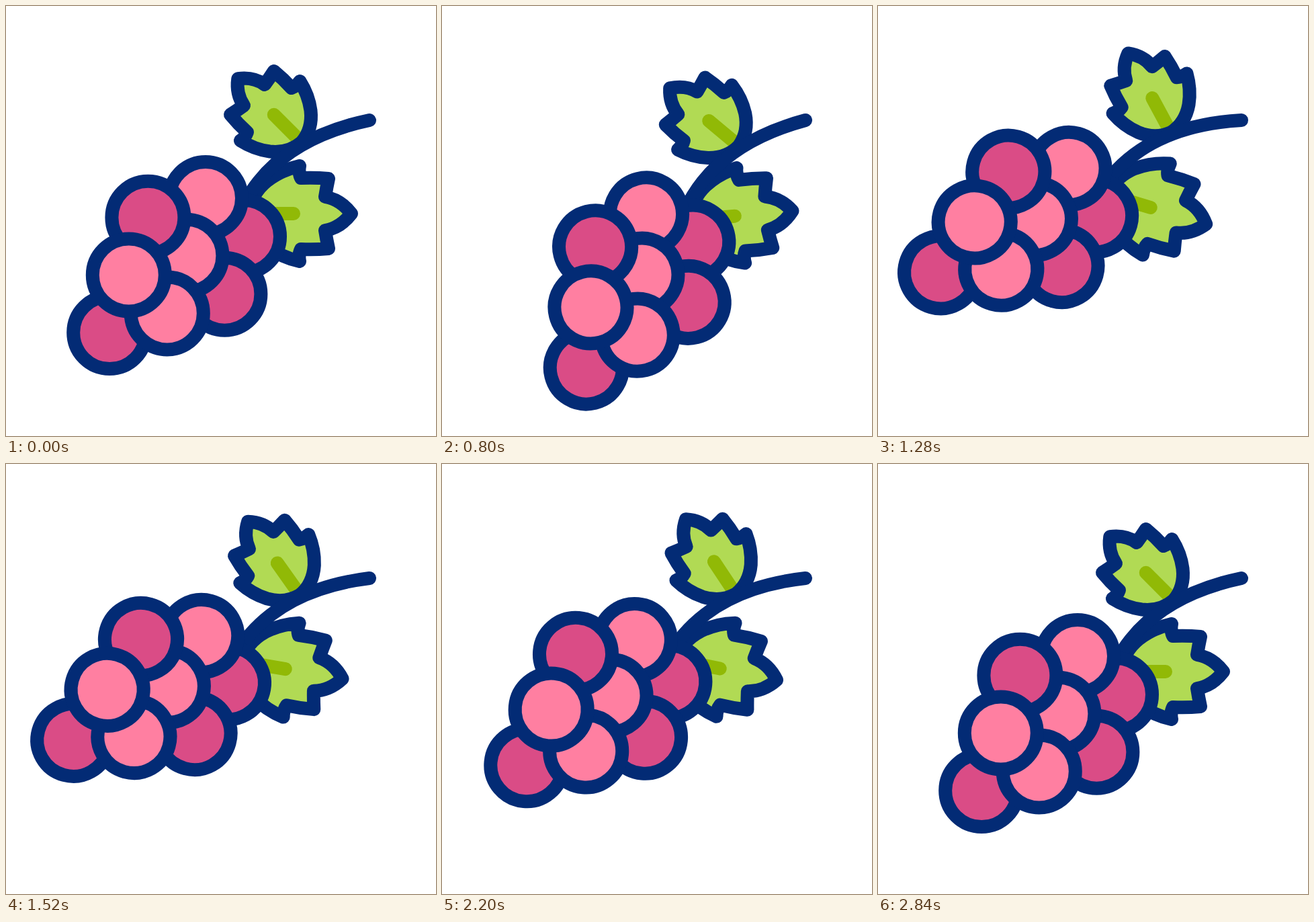
An HTML page for the animation above (3000 ms loop, 640 by 640 pixels).

```html
<!DOCTYPE html>
<html lang="en">
<head>
<meta charset="utf-8">
<title>Swinging grapes</title>
<style>
  html, body { margin: 0; width: 100%; height: 100%; overflow: hidden; background: #fff; }
  svg { display: block; width: 100%; height: 100%; }
  path, circle { fill: none; stroke: #032b75; }
  .leaf { fill: #b1da54; stroke: none; }
  .vein { stroke: #91b906; }
  .light { fill: #ff7fa1; }
  .dark { fill: #da4c86; }
</style>
</head>
<body>
<svg viewBox="0 0 640 640" stroke-width="20" stroke-linecap="round" stroke-linejoin="round">
  <g id="branch">
    <g id="upper"></g>
    <g id="lower"></g>
    <path d="M541 170C460 187 390 225 353 297"/>
    <g id="bunch"></g>
  </g>
</svg>
<script>
  const LOOP = 3000;
  const BEATS = [200, 700, 1220, 1800, 2180, 2600];

  // Every part swings on the same beats, each with its own lag and pivot.
  const parts = [
    { id: 'branch', lag: 0, pivot: [541, 170], angles: [0, -4.5, 8.9, 1.1, 5.6, 0] },
    { id: 'upper', lag: 50, pivot: [433, 203], angles: [0, -2.2, 8, 0.3, 5.9, 0] },
    { id: 'lower', lag: 50, pivot: [357, 306], angles: [0, -2.2, 8, 0.3, 5.9, 0] },
    { id: 'bunch', lag: 210, pivot: [349, 293], angles: [0, -12.6, 11.8, -5.5, 4.8, 0] }
  ];

  const byId = id => document.getElementById(id);
  const ease = p => p * p * (3 - 2 * p);

  // Half an outline from tip to base: curve ends alternate with control points.
  const halfLeaf = [
    [88, 0], [72, 21], [49, 25], [51, 38], [54, 52], [34, 54], [13, 53],
    [9, 61], [11, 71], [-16, 65], [-37, 49], [-62, 29], [-64, 0]
  ];

  function leaf(x, y, turn, size) {
    const mirrored = halfLeaf.slice(0, -1).reverse().map(([px, py]) => [px, -py]);
    const [tip, ...rest] = [...halfLeaf, ...mirrored];
    const outline = `M${tip}Q${rest.join(' ')}Z`;
    return `<g transform="translate(${x} ${y}) rotate(${turn}) scale(${size})" stroke-width="${20 / size}">
      <path class="leaf" d="${outline}"/><path class="vein" d="M2 0H-56"/><path d="${outline}"/></g>`;
  }

  // The grapes sit on a slanted lattice; later ones overlap earlier ones.
  function grape(column, row) {
    const x = 297 + 57 * column - 28.6 * row;
    const y = 286 + 57 * column + 85.7 * row;
    const isDark = column > 0 || (column < 0 && row % 2);
    return `<circle class="${isDark ? 'dark' : 'light'}" cx="${x}" cy="${y}" r="54"/>`;
  }

  byId('upper').innerHTML = leaf(400, 163, -135, 0.88);
  byId('lower').innerHTML = leaf(426, 309, 0, 1);

  let grapes = grape(-1, 3);
  for (let column = 1; column >= -1; column--) {
    const first = column < 0 ? 1 : 0;
    const last = column > 0 ? 1 : 2;
    for (let row = first; row <= last; row++) grapes += grape(column, row);
  }
  byId('bunch').innerHTML = grapes;

  function angleAt(angles, time) {
    const next = BEATS.findIndex(beat => beat > time);
    if (next < 1) return 0;
    const start = BEATS[next - 1];
    const progress = (time - start) / (BEATS[next] - start);
    return angles[next - 1] + (angles[next] - angles[next - 1]) * ease(progress);
  }

  function draw() {
    const time = performance.now() % LOOP;
    for (const { id, lag, pivot, angles } of parts) {
      byId(id).setAttribute('transform', `rotate(${angleAt(angles, time - lag)} ${pivot.join(' ')})`);
    }
    requestAnimationFrame(draw);
  }

  draw();
</script>
</body>
</html>
```
